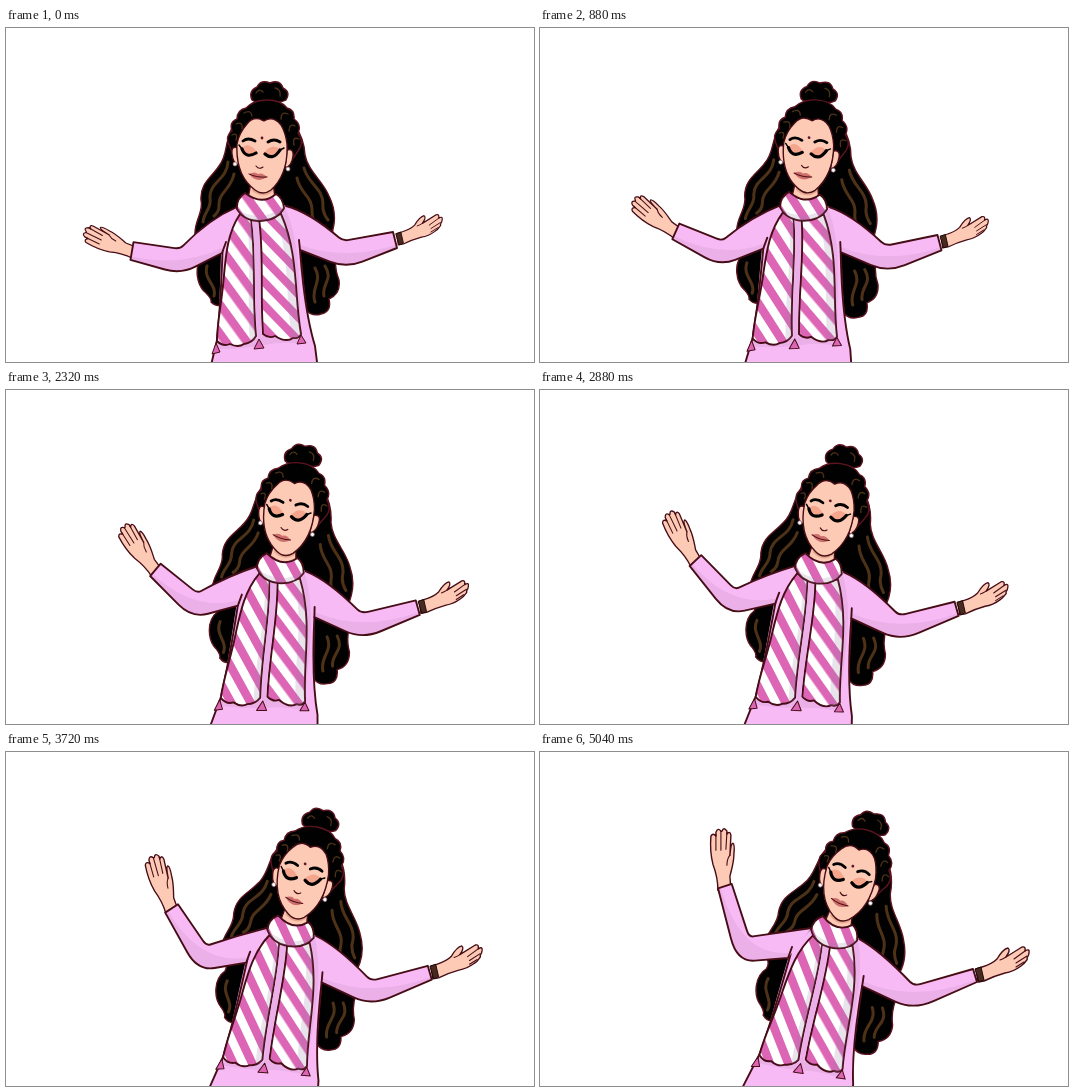
Animation, 528 px wide and 334 px high, one loop 5080 ms. Source, as an HTML page:

```html
<!DOCTYPE html>
<html lang="en">
<head>
<meta charset="utf-8">
<title>Swaying dancer</title>
<style>
  html, body { margin: 0; width: 100%; height: 100%; overflow: hidden; background: #fff; }
  svg { display: block; width: 528px; height: 334px; }
  .ln { fill: none; stroke: #470d16; stroke-width: 1.9; stroke-linecap: round; stroke-linejoin: round; }
  .thin { stroke-width: 1.1; }
  .skin { fill: #fccab5; stroke: #470d16; stroke-width: 1.4; stroke-linejoin: round; }
  .pink { fill: #f7baf5; }
  .shade { fill: #ecb0e8; }
  .hair { fill: #020101; stroke: #5c1420; stroke-width: 1.4; stroke-linejoin: round; }
  .lock { fill: none; stroke: #4d3218; stroke-width: 3; stroke-linecap: round; }
  .stripe { stroke: #470d16; stroke-width: 1.9; stroke-linejoin: round; }
  .fold { fill: #9a86a8; opacity: .22; }
  .tassel { fill: #dc65b6; stroke: #470d16; stroke-width: 1; stroke-linejoin: round; }
  .ink { fill: none; stroke: #020101; stroke-linecap: round; stroke-linejoin: round; }
</style>
</head>
<body>
<svg viewBox="0 0 528 334">
  <defs>
    <pattern id="steep" width="18" height="17" patternUnits="userSpaceOnUse" patternTransform="translate(0 4) rotate(54)">
      <rect width="18" height="17" fill="#fff"/>
      <rect width="18" height="8.5" fill="#dc65b6"/>
    </pattern>
    <pattern id="slant" width="18" height="16" patternUnits="userSpaceOnUse" patternTransform="translate(0 4) rotate(46)">
      <rect width="18" height="16" fill="#fff"/>
      <rect width="18" height="8" fill="#dc65b6"/>
    </pattern>
  </defs>

  <g class="sway">
    <path class="hair" d="M226 100C218 116 222 127 213 138C206 149 194 155 195 172C198 184 188 193 189 207C191 217 200 220 197 229C187 239 191 258 200 265Q206 271 205 274Q211 280 217 276L240 230H295L300 282Q306 289 315 286Q326 284 323 271Q335 266 333 252Q328 240 330 226Q324 211 328 196Q330 182 323 168C317 153 302 143 299 127Q298 110 289 98Z"/>
    <path class="lock" d="M222 134C221 152 203 154 204 170C206 180 198 184 197 194M228 146C225 162 212 164 213 178Q213 184 208 188M201 238C197 252 211 256 208 268M298 140C302 156 317 160 317 176Q316 184 322 192M291 150C294 166 307 168 306 184Q306 192 311 198M319 238C328 252 315 256 318 268M309 240C317 254 304 260 309 274"/>
    <path class="pink" d="M231 180L216 206C214 240 214 282 211 312L202 350L198 380H322L313 350L309 318C302 295 298 262 294 222L302 188L278 177Z"/>
    <path class="shade" d="M278 178Q289 200 292 234C295 270 293 300 297 309L294 311C288 260 291 220 276 190ZM211 312Q230 322 250 311T296 309L297 316Q278 313 258 317T210 321Z"/>
    <path class="ln" d="M217 208C216 245 214 282 211 312L202 350M294 222C297 262 302 295 309 318L313 350"/>
  </g>

  <g id="leftHand">
    <path class="skin" d="M-7 4C-7 -8 -9 -14 -12 -22C-14 -30 -15 -38 -14 -50Q-12 -54 -9 -50L-9 -54Q-7 -59 -4 -55L-3 -55Q-1 -60 2 -55L2 -52Q5 -56 6 -51L5 -31Q6 -43 8 -43Q10 -42 9 -32C9 -24 7 -18 5 -10L6 4Z"/>
    <path class="ln thin" d="M5 -31Q2 -27 2 -21M-9 -52V-36M-4 -55V-36M2 -54L1 -37"/>
  </g>
  <g id="rightHand">
    <path class="skin" d="M-4 -5L2 -7Q12 -10 17 -15Q23 -25 28 -26Q31 -24 26 -17L42 -27Q46 -28 45 -23Q50 -26 49 -21Q49 -19 47 -16Q48 -15 46 -13Q44 -10 41 -8Q33 -2 25 -1Q14 2 4 7L-2 8Z"/>
    <path class="ln thin" d="M26 -17Q23 -15 20 -14M45 -23L34 -15M47 -18L36 -11M44 -12L36 -7"/>
    <path d="M-5 -5L1 -7L4 6L-1 8Z" fill="#4a2a20" stroke="#1d0808"/>
  </g>
  <g id="leftArm"><path class="pink"/><path class="shade"/><path class="ln"/></g>
  <g id="rightArm"><path class="pink"/><path class="shade"/><path class="ln"/></g>

  <g class="sway">
    <path class="stripe" fill="url(#steep)" d="M234 186C222 204 220 225 218 247C216 274 211 294 211 313Q217 319 224 316Q232 320 238 316Q246 315 250 308C246 268 250 230 245 191Z"/>
    <path class="fold" d="M240 192C247 225 240 270 244 313Q248 313 250 308C246 268 250 230 245 191Z"/>
    <path class="stripe" fill="url(#slant)" d="M253 191C258 225 254 262 257 306Q263 311 269 308Q280 315 287 310Q293 311 295 306C288 268 293 227 275 186Z"/>
    <path class="fold" d="M270 190C284 226 279 270 286 311Q293 311 295 306C288 268 293 227 275 186Z"/>
    <path class="shade" d="M246 193L252 193C256 230 253 270 256 308L252 310C247 270 251 230 246 193Z"/>
    <path class="tassel" d="M210 315L206 326L214 324ZM253 311L248 321L258 320ZM295 307L291 316L300 315Z"/>

    <path class="skin" d="M245 154L242 171Q255 181 269 170L267 154Z"/>
    <path d="M246 160Q258 172 267 158V163Q258 172 246 163Z" fill="#e9a990"/>
    <path class="stripe" fill="url(#steep)" d="M239 165Q230 171 231 181Q238 193 254 193Q272 192 278 180Q277 170 270 166Q256 178 239 165Z"/>
    <path class="fold" d="M231 181Q238 193 254 193Q272 192 278 180L277 177Q266 188 253 188Q239 187 231 181Z"/>

    <path class="hair" d="M246 72Q242 63 251 59Q255 51 264 55Q274 51 277 60Q285 64 280 72Q273 76 262 73Q252 77 246 72Z"/>
    <path class="hair" d="M223 117Q219 108 226 103Q223 94 231 91Q231 82 240 80Q248 72 261 72Q275 72 281 80Q289 82 288 91Q296 97 292 105Q299 114 292 123L284 135H231Z"/>
    <path class="lock" style="stroke-width:1.3" d="M250 65Q253 60 257 64M269 60Q275 61 274 68M226 107Q232 104 230 112M230 96Q237 93 236 101M238 85Q245 81 246 88M282 86Q275 83 275 91M289 98Q283 95 283 103M293 111Q286 108 288 117"/>
    <path class="skin" d="M232 120Q225 117 226 126Q227 136 233 137ZM281 122Q288 120 287 128Q286 138 279 140Z"/>
    <path class="skin" d="M231 116C230 135 234 151 249 162Q257 168 265 162C276 152 282 136 281 116C280 108 278 102 275 97Q267 87 258 93Q248 87 241 96Q233 105 231 116Z"/>
    <g fill="#f4a58c">
      <path d="M235 121Q242 112 251 124Q243 130 235 121Z"/>
      <path d="M258 125Q266 114 275 122Q267 131 258 125Z"/>
    </g>
    <g class="ink">
      <path stroke-width="3.2" d="M236 121Q240 131 250 125M259 126Q267 133 274 122"/>
      <path stroke-width="1.4" d="M236 121L233 117M274 122L278 120"/>
      <path stroke-width="2.8" d="M237 113Q242 109 249 113M262 114Q268 110 274 114"/>
    </g>
    <circle cx="256" cy="110" r="1.4" fill="#5c1420"/>
    <path class="ln thin" d="M250 138Q253 142 257 139"/>
    <path d="M243 146Q249 143 252 146Q256 144 261 149Q251 156 243 146Z" fill="#cf6f6c"/>
    <path class="ln" style="stroke-width:1" d="M243 146Q251 150 261 149"/>
    <g fill="#fff" stroke="#8a6a70" stroke-width=".7">
      <circle cx="229" cy="136" r="2"/><circle cx="282" cy="141" r="2"/>
    </g>
  </g>
</svg>
<script>
const STEP = 40, LOOP = 5080, LAST = LOOP - STEP;
const PIVOT = [253, 342], TILT = 14.2, GROW = 0.016, RAD = Math.PI / 180;
const $ = id => document.getElementById(id);
const sways = document.querySelectorAll('.sway');
const mix = (a, b, p) => a + (b - a) * p;
const mixPt = (a, b, p) => [mix(a[0], b[0], p), mix(a[1], b[1], p)];
const add = (a, x, y) => [a[0] + x, a[1] + y];
const pt = a => a[0].toFixed(2) + ' ' + a[1].toFixed(2);

// Steady drift with a short quick start
function progress(t) {
  const k = 0.07;
  return (t / LAST + k * (1 - Math.exp(-t / 220))) / (1 + k);
}

// Body motion: tilt about the hips with a slight vertical stretch
function bodyPoint([x, y], p) {
  const c = Math.cos(TILT * p * RAD), s = Math.sin(TILT * p * RAD);
  const dx = x - PIVOT[0], dy = y - PIVOT[1];
  return [PIVOT[0] + dx * c - dy * s, PIVOT[1] + (dx * s + dy * c) * (1 + GROW * p)];
}

function sleeve(id, j) {
  const a = mixPt(j.elbow, j.cuffLow, 0.32), b = mixPt(j.elbow, j.pit, 0.35);
  const under = `L${pt(a)}Q${pt(j.elbow)} ${pt(b)}L${pt(j.pit)}`;
  const top = mixPt(j.inner, j.cuffTop, 0.12);
  const line = `M${pt(j.shoulder)}Q${pt(j.bend)} ${pt(mixPt(j.inner, j.bend, 0.12))}` +
    `Q${pt(j.inner)} ${pt(top)}L${pt(j.cuffTop)}L${pt(j.cuffLow)}${under}`;
  const mid = mixPt(j.elbow, j.inner, 0.25);
  const [fill, shade, edge] = $(id).children;
  fill.setAttribute('d', line + 'Z');
  shade.setAttribute('d', `M${pt(j.cuffLow)}${under}L${pt(add(j.pit, 0, -5))}` +
    `Q${pt(mid)} ${pt(mixPt(j.cuffLow, j.cuffTop, 0.2))}Z`);
  edge.setAttribute('d', line + `L${pt(j.crease)}`);
}

function place(id, at, deg, size) {
  $(id).setAttribute('transform', `translate(${pt(at)}) rotate(${deg}) scale(${size})`);
}

function draw(t) {
  const p = progress(t);
  const at = (a, b) => mixPt(a, b, p);
  const body = (x, y) => bodyPoint([x, y], p);
  const [px, py] = PIVOT;
  for (const g of sways) {
    g.setAttribute('transform',
      `translate(${px} ${py}) scale(1 ${1 + GROW * p}) rotate(${TILT * p}) translate(${-px} ${-py})`);
  }

  // Raised arm: the forearm swings about the elbow and lengthens
  const swing = mix(9.7, 72, p) * RAD, reach = 47.7 + 17.3 * p * p;
  const dx = -Math.cos(swing), dy = -Math.sin(swing), half = mix(9, 7.2, p);
  const cuff = add(at([173, 231], [205, 196]), dx * reach, dy * reach);
  const pit = at([216, 225], [248, 206]);
  sleeve('leftArm', {
    shoulder: body(231, 179),
    bend: at([203, 191], [243, 180]),
    inner: at([174, 221], [209, 185]),
    cuffTop: add(cuff, -dy * half, dx * half),
    cuffLow: add(cuff, dy * half, -dx * half),
    elbow: at([175, 246], [197, 210]),
    pit,
    crease: add(pit, 4, -11)
  });
  place('leftHand', cuff, -64 * (1 - p), mix(0.9, 1, p));

  // Lower arm: keeps its angle and comes a little closer
  sleeve('rightArm', {
    shoulder: body(280, 178),
    bend: body(303, 184),
    inner: at([337, 213], [374, 234]),
    cuffTop: at([387, 204], [433, 217]),
    cuffLow: at([391, 220], [437, 230]),
    elbow: at([340, 240], [373, 258]),
    pit: body(294, 222),
    crease: body(293, 212)
  });
  place('rightHand', at([394, 210], [440, 222]), 0, mix(0.86, 1, p));
}

let start;
function tick(now) {
  start ??= now;
  draw(Math.floor((now - start) % LOOP / STEP) * STEP);
  requestAnimationFrame(tick);
}
draw(0);
requestAnimationFrame(tick);
</script>
</body>
</html>
```
